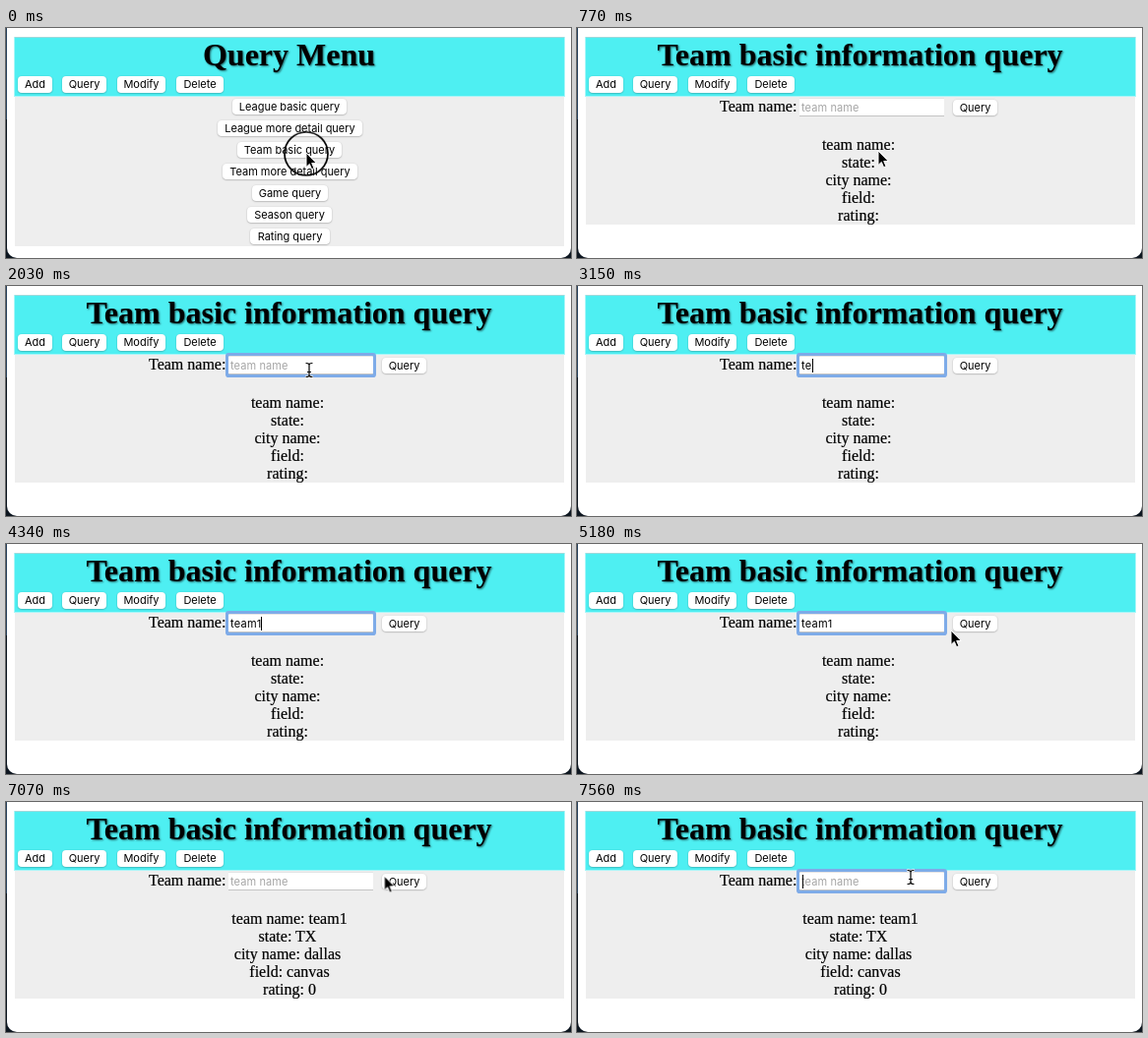
Write an HTML page that moves like this. It is 574x234 px and loops after 8000 ms.

```html
<!DOCTYPE html>
<html lang="en">
<head>
<meta charset="utf-8">
<title>Team query</title>
<style>
html, body { margin: 0; width: 100%; height: 100%; overflow: hidden; }
#stage {
  position: relative; width: 574px; height: 234px; overflow: hidden;
  background: linear-gradient(#2b4560 93px, #0d1620 93px);
  font: 16px/18px "Liberation Serif", Times, serif; color: #000;
}
#stage div, #stage h1, #stage p, .btn { position: absolute; margin: 0; white-space: nowrap; }
#window { left: 1px; top: 0; width: 573px; height: 234px; background: #fff; border-radius: 0 0 10px 10px; }
#header {
  left: 9px; top: 10px; width: 558px; height: 59px; background: #4eeff2;
  box-shadow: 0 -1px #9fd9da, 0 0 0 1px #a6f6f8;
}
.layer { left: 0; top: 0; width: 574px; height: 234px; }
.panel { left: 9px; top: 70px; width: 558px; background: #eee; }
#stage h1 {
  left: 9px; top: 9px; width: 557px; text-align: center;
  font-size: 32px; line-height: 37px; text-shadow: 1px 1px 2px rgba(0, 0, 0, .6);
}
.btn, #field { font: 11px/16px Inter, sans-serif; }
.btn {
  height: 16px; text-align: center; background: #fff; border-radius: 4px;
  letter-spacing: -.02px; box-shadow: 0 .5px 1.5px rgba(0, 0, 0, .35);
}
.nav { top: 49px; height: 17px; }
#label, .lines { -webkit-text-stroke: .2px #000; }
#label { left: 145px; top: 71px; }
#stage .lines { left: 9px; top: 110px; width: 558px; text-align: center; }

#field {
  left: 226px; top: 71px; width: 147px; height: 19px; background: #fff;
  box-shadow: inset 0 -1px #c4c4c4, inset 0 1px #e4e4e4;
}
#ring { inset: 0; border-radius: 1px; box-shadow: 0 0 0 3px #7eabe8; }
#hint { left: 2px; top: 2px; color: #a6a6a6; letter-spacing: .01em; }
#typed { left: 2px; top: 2px; height: 16px; display: flex; align-items: center; letter-spacing: .02em; }
#typed span { font-size: 0; }
#typed i { width: 1px; height: 14px; background: #000; }

#cursor { left: 0; top: 0; width: 0; height: 0; }
#cursor svg { position: absolute; left: 0; top: 0; width: 1px; height: 1px; overflow: visible; }

/* One shared 8 s clock; values hold until the next key. */
.layer, #ring, #hint, #typed span, #typed i, .lines, #submit, #cursor, #arrow, #beam, #click {
  animation: 8s step-end infinite;
}
#menu { animation-name: menu; }
#page { animation-name: page; }
#ring { animation-name: ring; }
#hint { animation-name: hint; }
#typed span:nth-child(1) { animation-name: key1; }
#typed span:nth-child(2) { animation-name: key2; }
#typed span:nth-child(3) { animation-name: key3; }
#typed span:nth-child(4) { animation-name: key4; }
#typed span:nth-child(5) { animation-name: key5; }
#typed i { animation-name: caret; }
#empty { animation-name: empty; }
#result { animation-name: result; }
#submit { animation-name: press; }
#cursor { animation-name: move, hide; }
#arrow { animation-name: arrow; }
#beam { animation-name: beam; }
#click { animation-name: click; }

@keyframes menu { 0% { opacity: 1; } 8.75%, 100% { opacity: 0; } }
@keyframes page { 0% { opacity: 0; } 8.75%, 100% { opacity: 1; } }
@keyframes ring { 0%, 78.75% { opacity: 0; } 18.375%, 93.625%, 100% { opacity: 1; } }
@keyframes hint { 0%, 82.25%, 100% { opacity: 1; } 35.875% { opacity: 0; } }
@keyframes key1 { 0%, 82.25%, 100% { font-size: 0; } 35.875% { font-size: 11px; } }
@keyframes key2 { 0%, 82.25%, 100% { font-size: 0; } 39.375% { font-size: 11px; } }
@keyframes key3 { 0%, 82.25%, 100% { font-size: 0; } 47.25% { font-size: 11px; } }
@keyframes key4 { 0%, 82.25%, 100% { font-size: 0; } 49.875% { font-size: 11px; } }
@keyframes key5 { 0%, 82.25%, 100% { font-size: 0; } 54.25% { font-size: 11px; } }
@keyframes caret {
  0%, 25.375%, 45.5%, 60.375%, 72.625% { opacity: 0; }
  19.25%, 31.5%, 47.25%, 66.5%, 94.5%, 100% { opacity: 1; }
}
@keyframes empty { 0% { opacity: 1; } 82.25%, 100% { opacity: 0; } }
@keyframes result { 0% { opacity: 0; } 82.25%, 100% { opacity: 1; } }
@keyframes press { 0%, 82.25%, 100% { background: #fff; } 78.75% { background: #ebebeb; } }

@keyframes move {
  0% { transform: translate(305px, 127px); }
  6.125% { transform: translate(306px, 125px); }
  12.25% { transform: translate(306px, 125px); animation-timing-function: steps(6, start); }
  17.5% { transform: translate(308px, 85px); }
  58.625% { transform: translate(308px, 85px); animation-timing-function: steps(3, end); }
  61.25% { transform: translate(338px, 105px); animation-timing-function: steps(4, end); }
  64.75% { transform: translate(380px, 88px); animation-timing-function: steps(4, end); }
  68.25% { transform: translate(405px, 69px); }
  69.125% { transform: translate(405px, 68px); }
  72.625% { transform: translate(405px, 68px); animation-timing-function: steps(3, start); }
  75.25% { transform: translate(407px, 75px); }
  87.5% { transform: translate(407px, 75px); animation-timing-function: steps(6, start); }
  92.75%, 100% { transform: translate(339px, 76px); }
}
@keyframes hide { 0%, 58.625%, 100% { opacity: 1; } 36.75% { opacity: 0; } }
@keyframes arrow { 0%, 59.5% { opacity: 1; } 16.625%, 90.125%, 100% { opacity: 0; } }
@keyframes beam { 0%, 59.5% { opacity: 0; } 16.625%, 90.125%, 100% { opacity: 1; } }
@keyframes click {
  0%, 77.875% { opacity: 1; transform: translateY(.8px) scale(22); }
  .875%, 19.25%, 78.75%, 94.5%, 100% { opacity: 0; transform: translateY(.8px) scale(22); }
  17.5%, 92.75% { opacity: 1; transform: translateY(.5px) scale(16.5); }
  18.375%, 93.625% { opacity: 1; transform: translateY(.5px) scale(18); }
}
</style>
</head>
<body>
<div id="stage">
  <div id="window"></div>
  <div id="header"></div>

  <div id="menu" class="layer">
    <div class="panel" style="height:152px"></div>
    <h1>Query Menu</h1>
    <span class="btn" style="left:230px;top:72px;width:116px">League basic query</span>
    <span class="btn" style="left:215px;top:94px;width:147px">League more detail query</span>
    <span class="btn" style="left:235px;top:116px;width:106px">Team basic query</span>
    <span class="btn" style="left:220px;top:138px;width:137px">Team more detail query</span>
    <span class="btn" style="left:250px;top:160px;width:77px">Game query</span>
    <span class="btn" style="left:245px;top:182px;width:86px">Season query</span>
    <span class="btn" style="left:248px;top:204px;width:81px">Rating query</span>
  </div>

  <div id="page" class="layer">
    <div class="panel" style="height:130px"></div>
    <h1>Team basic information query</h1>
    <div id="label">Team name:</div>
    <div id="field">
      <div id="ring"></div>
      <div id="hint">team name</div>
      <div id="typed"><span>t</span><span>e</span><span>a</span><span>m</span><span>1</span><i></i></div>
    </div>
    <span id="submit" class="btn" style="left:382px;top:73px;width:45px">Query</span>
    <p id="empty" class="lines">team name:&nbsp;<br>state:&nbsp;<br>city name:&nbsp;<br>field:&nbsp;<br>rating:&nbsp;</p>
    <p id="result" class="lines">team name: team1<br>state: TX&nbsp;<br>city name: dallas&nbsp;<br>field: canvas<br>rating: 0</p>
  </div>

  <span class="btn nav" style="left:12px;width:35px">Add</span>
  <span class="btn nav" style="left:57px;width:45px">Query</span>
  <span class="btn nav" style="left:113px;width:49px">Modify</span>
  <span class="btn nav" style="left:173px;width:48px">Delete</span>

  <div id="cursor">
    <svg>
      <path id="arrow" d="M0 0V14.5L3.3 11.4L5.6 16.7L8 15.7L5.7 10.5H10.3Z" stroke="#fff"/>
      <g id="beam" fill="none" stroke-linecap="round">
        <path d="M-3 -6.5Q0 -6.5 0 -4.5Q0 -6.5 3 -6.5M0 -4.5V5.5M-3 7.5Q0 7.5 0 5.5Q0 7.5 3 7.5M-1.5 2.5H1.5" stroke="#fff" stroke-width="2.4"/>
        <path d="M-3 -6.5Q0 -6.5 0 -4.5Q0 -6.5 3 -6.5M0 -4.5V5.5M-3 7.5Q0 7.5 0 5.5Q0 7.5 3 7.5M-1.5 2.5H1.5" stroke="#000" stroke-width="1.2"/>
      </g>
      <circle id="click" r="1" fill="none" stroke="#000" stroke-width="1.7" vector-effect="non-scaling-stroke"/>
    </svg>
  </div>
</div>
</body>
</html>
```
